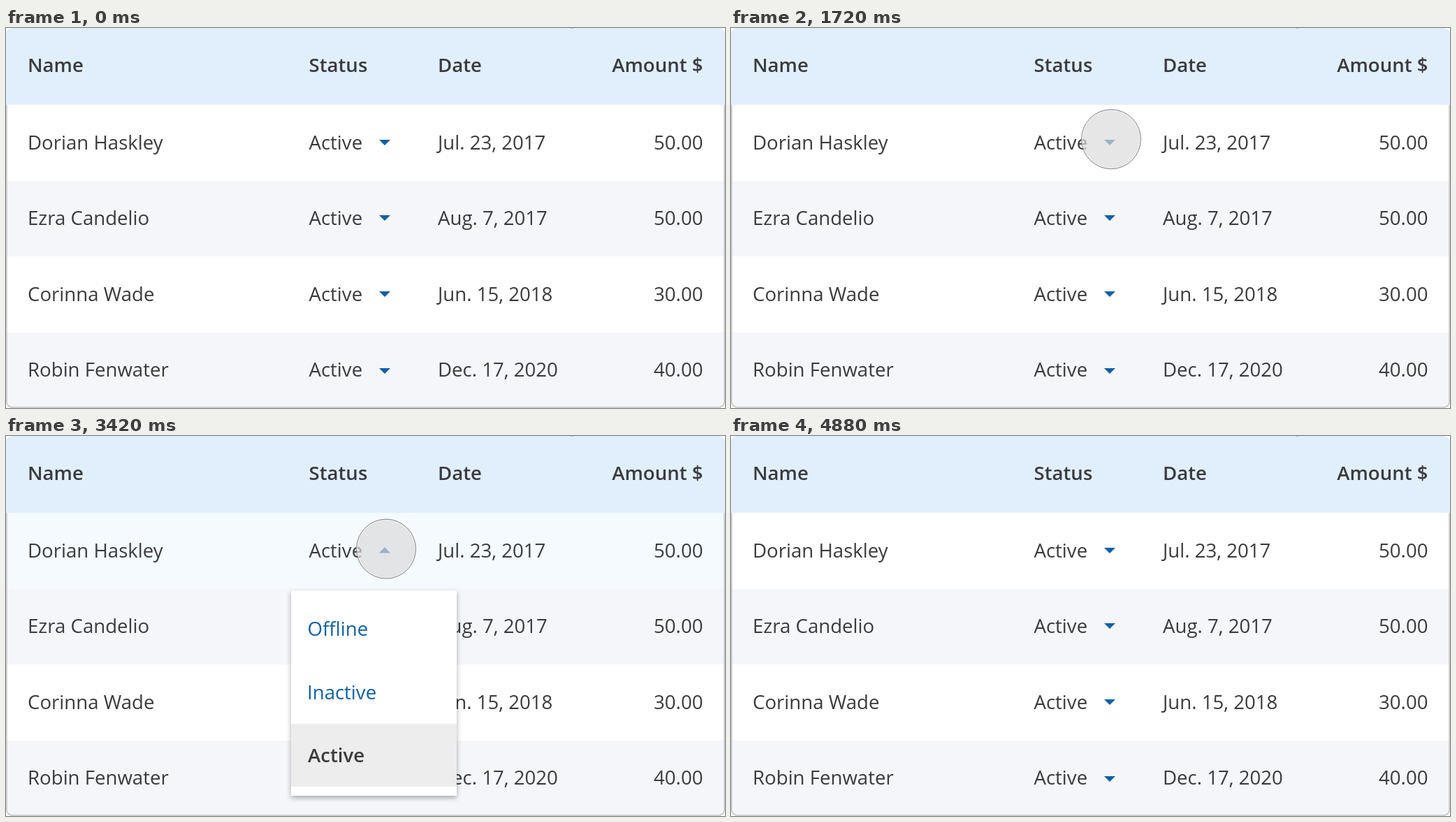
Recreate the animation shown at these times as an HTML page with a canvas. Size 1029x544 px, loop 5680 ms.

```html
<!DOCTYPE html>
<html lang="en">
<head>
<meta charset="utf-8">
<title>Status table</title>
<style>
html, body { margin: 0; width: 100%; height: 100%; overflow: hidden; background: #fff; }
canvas { display: block; width: 1029px; height: 544px; }
</style>
</head>
<body>
<canvas id="stage" width="1029" height="544"></canvas>
<script>
const W = 1029, H = 544, LOOP = 5680, STEP = 20;
const INK = '#3b3b3d', BLUE = '#0f60a8';
const ctx = document.getElementById('stage').getContext('2d');

const rows = [
  ['Dorian Haskley', 'Jul. 23, 2017', '50.00'],
  ['Ezra Candelio', 'Aug. 7, 2017', '50.00'],
  ['Corinna Wade', 'Jun. 15, 2018', '30.00'],
  ['Robin Fenwater', 'Dec. 17, 2020', '40.00']
];
const rowTops = [110, 219, 327, 436, 544];
const baselines = [174, 282, 391, 499];
const arrowTops = [160, 268, 377, 487];

// Cursor keys: time, x, y
const pathIn = [[500, 919, 16], [520, 905, 22], [680, 717, 97], [860, 640, 128],
  [1080, 586, 149], [1380, 544, 159.6]];
const pathOut = [[4140, 544, 162], [4160, 546, 159.6], [4400, 712, 99],
  [4720, 893, 28], [4880, 919, 18]];

const clamp = v => Math.max(0, Math.min(1, v));
const ramp = (t, from, to) => clamp((t - from) / (to - from));
const smooth = p => p * p * (3 - 2 * p);

// Monotone cubic through the keys, column c
function along(keys, c, t) {
  const last = keys.length - 1;
  if (t <= keys[0][0]) return keys[0][c];
  if (t >= keys[last][0]) return keys[last][c];
  const i = keys.findIndex(k => k[0] > t) - 1;
  const slope = j => (keys[j + 1][c] - keys[j][c]) / (keys[j + 1][0] - keys[j][0]);
  const tangent = j => {
    if (j === 0) return slope(0);
    if (j === last) return slope(last - 1) / 2;
    const a = slope(j - 1), b = slope(j);
    return a * b <= 0 ? 0 : 2 * a * b / (a + b);
  };
  const [t0, t1] = [keys[i][0], keys[i + 1][0]];
  const h = t1 - t0, u = (t - t0) / h, e = smooth(u);
  return keys[i][c] * (1 - e) + keys[i + 1][c] * e +
    h * u * (1 - u) * (tangent(i) * (1 - u) - tangent(i + 1) * u);
}

function text(c, str, x, y, color = INK, weight = 400, align = 'left') {
  c.font = weight + ' 27.6px "Open Sans", "Noto Sans", sans-serif';
  c.textAlign = align;
  c.fillStyle = color;
  c.fillText(str, x, y);
}

function rect(c, color, x, y, w, h) {
  c.fillStyle = color;
  c.fillRect(x, y, w, h);
}

function arrow(top, up, alpha = 1) {
  const base = up ? top + 7.5 : top, tip = up ? top - 1 : top + 8;
  ctx.globalAlpha = alpha;
  ctx.fillStyle = BLUE;
  ctx.beginPath();
  ctx.moveTo(534, base);
  ctx.lineTo(550, base);
  ctx.lineTo(542, tip);
  ctx.fill();
  ctx.globalAlpha = 1;
}

function makeMenu() {
  const layer = document.createElement('canvas');
  layer.width = W;
  layer.height = H;
  const c = layer.getContext('2d');
  c.shadowColor = 'rgba(0,0,0,0.32)';
  c.shadowBlur = 7;
  c.shadowOffsetY = 3;
  rect(c, '#fff', 408, 221, 237, 294);
  c.shadowColor = 'transparent';
  rect(c, '#ededed', 408, 412, 237, 90);
  text(c, 'Offline', 431.5, 286, BLUE);
  text(c, 'Inactive', 431, 377, BLUE);
  text(c, 'Active', 432, 467, INK, 600);
  return layer;
}

function drawTable(open) {
  ctx.save();
  ctx.beginPath();
  ctx.roundRect(0, 0, W, H, 9);
  ctx.clip();
  rect(ctx, '#e1effd', 0, 0, W, 110);
  for (let i = 0; i < 4; i++) {
    rect(ctx, i % 2 ? '#f5f6fa' : '#fff', 0, rowTops[i], W, rowTops[i + 1] - rowTops[i]);
  }
  ctx.globalAlpha = open;
  rect(ctx, '#f4faff', 0, 110, W, 109);
  ctx.globalAlpha = 1;
  rect(ctx, '#b9c3cd', 808, 0, 5, 1);
  ctx.restore();

  ctx.strokeStyle = '#c3c4c8';
  ctx.lineWidth = 1.6;
  ctx.beginPath();
  ctx.moveTo(0.9, 110);
  ctx.arcTo(0.9, 543, 10, 543, 8);
  ctx.arcTo(1028.1, 543, 1028.1, 500, 8);
  ctx.lineTo(1028.1, 110);
  ctx.stroke();

  text(ctx, 'Name', 31, 63, INK, 600);
  text(ctx, 'Status', 433.5, 63, INK, 600);
  text(ctx, 'Date', 618, 63, INK, 600);
  text(ctx, 'Amount $', 997.5, 63, INK, 600, 'right');
  rows.forEach(([name, date, amount], i) => {
    const y = baselines[i];
    text(ctx, name, 31, y);
    text(ctx, 'Active', 433.5, y);
    text(ctx, date, 618, y);
    text(ctx, amount, 997.5, y, INK, 400, 'right');
    arrow(arrowTops[i], false, i ? 1 : 1 - open);
  });
  arrow(arrowTops[0], true, open);
}

function ring(x, y, r, color) {
  ctx.beginPath();
  ctx.arc(x, y, r, 0, 7);
  ctx.strokeStyle = color;
  ctx.stroke();
}

function drawCursor(t) {
  const alpha = ramp(t, 500, 600) * (1 - ramp(t, 4730, 4880));
  if (!alpha) return;
  const entering = t < 3000;
  const keys = entering ? pathIn : pathOut;
  const release = smooth(entering ? ramp(t, 1840, 2000) : ramp(t, 3600, 3760));
  const press = t >= (entering ? 1720 : 3420) ? 1 - release : 0;
  const x = along(keys, 1, t);
  const y = along(keys, 2, t) + (entering ? 2.4 * release : 0) - 0.4 * press;
  const r = 45 - 2 * press;
  ctx.save();
  ctx.globalAlpha = alpha;
  ctx.fillStyle = `rgba(218,218,218,${0.29 + 0.39 * press})`;
  ctx.beginPath();
  ctx.arc(x, y, r - 0.5, 0, 7);
  ctx.fill();
  ctx.lineWidth = 1;
  ring(x, y, r - 1.5, 'rgba(255,255,255,0.6)');
  ring(x, y, r - 0.5, `rgba(110,110,110,${0.6 + 0.25 * press})`);
  ctx.restore();
}

const menu = makeMenu();
const start = performance.now();

function draw(now) {
  const elapsed = Math.max(0, now - start) % LOOP;
  const t = Math.floor(elapsed / STEP) * STEP;
  const open = smooth(ramp(t, 1840, 2200)) * (1 - smooth(ramp(t, 3580, 3920)));
  rect(ctx, '#fff', 0, 0, W, H);
  drawTable(open);
  ctx.globalAlpha = open;
  ctx.drawImage(menu, 0, 0);
  ctx.globalAlpha = 1;
  drawCursor(t);
  requestAnimationFrame(draw);
}
draw(start);
</script>
</body>
</html>
```
